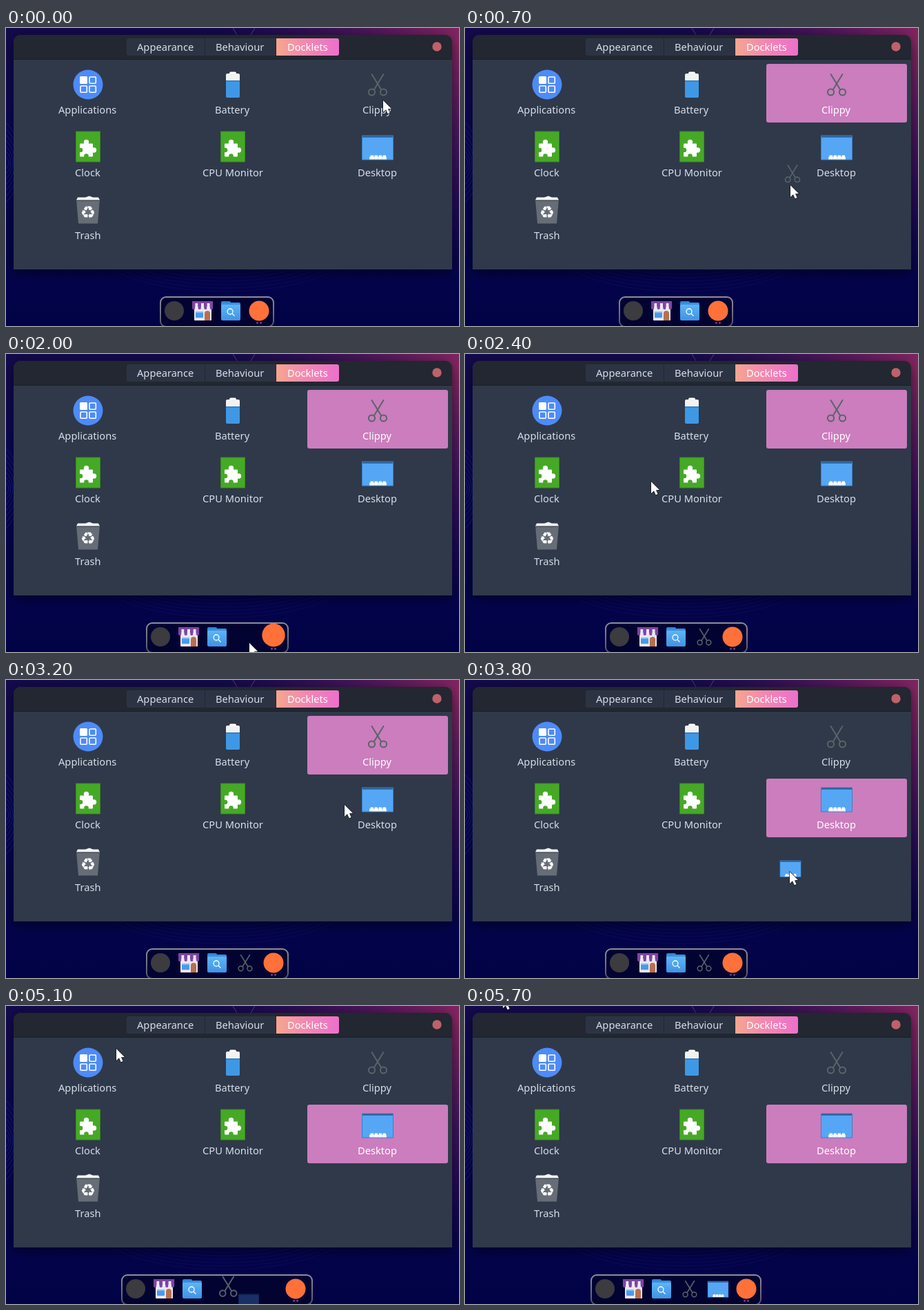
These frames come from a looping animation (657x432 px, 6000 ms). An HTML page with a canvas:

```html
<!DOCTYPE html>
<html lang="en">
<head>
<meta charset="utf-8">
<title>Adding docklets</title>
<style>
html, body { margin: 0; width: 100%; height: 100%; overflow: hidden; background: #05053f; }
canvas { display: block; }
</style>
</head>
<body>
<canvas id="stage" width="657" height="432"></canvas>
<script>
const W = 657, H = 432, LOOP = 6000, STEP = 100;
const SLOT = 41, DOCK_CENTER = 306, DOCK_Y = 410;
const FONT = '14.67px "Noto Sans", sans-serif';
const stage = document.getElementById('stage').getContext('2d');
let c = stage;

// Stops of the pointer: time, x, y
const ROUTE = [
  [200, 547, 105], [1350, 360, 411], [1700, 349, 415], [2000, 353, 419],
  [2600, 241, 103], [3400, 537, 196], [4350, 365, 410], [4800, 362, 411],
  [5100, 160, 62], [5400, 66, -30], [5600, 55, -14]
];

const clamp = v => Math.max(0, Math.min(1, v));
const ramp = (t, from, to) => clamp((t - from) / (to - from));
const smooth = p => p * p * (3 - 2 * p);
const between = (t, from, to) => t >= from && t < to;

function pointerAt(t) {
  let [, x, y] = ROUTE[0];
  for (let i = 1; i < ROUTE.length; i++) {
    const [time, nextX, nextY] = ROUTE[i];
    const p = smooth(ramp(t, ROUTE[i - 1][0], time));
    x += (nextX - x) * p;
    y += (nextY - y) * p;
  }
  return [x, y];
}

function box(x, y, w, h, fill, r = 0) {
  c.fillStyle = fill;
  c.beginPath();
  c.roundRect(x, y, w, h, r);
  c.fill();
}

function disc(x, y, r, fill) {
  c.fillStyle = fill;
  c.beginPath();
  c.arc(x, y, r, 0, Math.PI * 2);
  c.fill();
}

function ring(x, y, rx, ry = rx) {
  c.beginPath();
  c.ellipse(x, y, rx, ry, 0, 0, Math.PI * 2);
  c.stroke();
}

function poly(points, fill) {
  c.fillStyle = fill;
  c.beginPath();
  points.forEach(([x, y]) => c.lineTo(x, y));
  c.closePath();
  c.fill();
}

function line(x1, y1, x2, y2) {
  c.beginPath();
  c.moveTo(x1, y1);
  c.lineTo(x2, y2);
  c.stroke();
}

// Centred text, starting on a whole pixel
function label(text, x, y, fill = '#d8dee9') {
  c.font = FONT;
  c.textAlign = 'left';
  c.fillStyle = fill;
  c.fillText(text, Math.floor(x - c.measureText(text).width / 2), y);
}

function gradient(x1, y1, x2, y2, ...colors) {
  const g = c.createLinearGradient(x1, y1, x2, y2);
  colors.forEach((color, i) => g.addColorStop(i / (colors.length - 1), color));
  return g;
}

// Draws an icon with its centre at x, y
function place(icon, x, y, scale = 1, alpha = 1) {
  c.save();
  c.translate(x, y);
  c.scale(scale, scale);
  c.globalAlpha = alpha;
  icon();
  c.restore();
}

function applications() {
  disc(0, 0, 21.5, '#4d8bf8');
  box(-12, -12, 11, 11, '#fff', 1.5);
  c.strokeStyle = '#fff';
  c.lineWidth = 1.6;
  for (const [x, y] of [[2, -11], [-11, 2], [2, 2]]) {
    c.beginPath();
    c.roundRect(x, y, 9.3, 9.3, 1);
    c.stroke();
  }
}

function battery() {
  box(-5, -18.5, 10, 5, '#fff', 2);
  box(-10, -16, 20, 34, '#f2f2f2', 2);
  box(-10, -6, 20, 25, '#3f98e5', [0, 0, 2, 2]);
  box(-10, -6, 20, 1.5, '#2d78bd');
}

function scissors() {
  c.strokeStyle = '#596468';
  c.lineCap = 'round';
  c.lineWidth = 2;
  for (const side of [-1, 1]) {
    line(side * 8.5, -15, side * -5, 7);
    ring(side * 8.5, 11, 4.6);
  }
}

function puzzle() {
  box(-18, -23, 36, 45, '#3a8a20', 1);
  box(-17, -22, 34, 43, '#46a926');
  box(-12, -5, 19, 19, '#fff', 1);
  disc(-2.5, -7, 3.7, '#fff');
  disc(8.5, 4.5, 3.7, '#fff');
  disc(-11, 4.5, 3.3, '#46a926');
  disc(-2.5, 13, 3.3, '#46a926');
}

function desktop() {
  box(-23, -17, 46, 36, '#3b80c4', 1);
  box(-22, -14, 44, 32, '#55a7f5');
  box(-22, -16, 44, 2, '#2a5f94');
  box(-12, 14, 25, 4, '#d9ebfb', .5);
  for (let i = 0; i < 4; i++) box(-10.5 + i * 6, 12, 4.5, 5, '#fff', .5);
}

function trash() {
  poly([[-17, -15], [17, -15], [14, 20], [-14, 20]], '#666d77');
  poly([[-17, -14], [-15, -18], [-4, -18], [2, -20], [7, -18], [15, -18], [17, -14]], '#f4f4f4');
  box(-17, -14, 34, 1.5, '#4c535d');
  c.font = '25px "DejaVu Sans", sans-serif';
  c.textAlign = 'center';
  c.fillStyle = '#fff';
  c.fillText('\u267B\uFE0E', 0, 12);
}

function shop() {
  box(-12, -6, 25, 20, '#e9e6ef', 1);
  box(-10, 1, 11, 9, '#4a9ae8', 1);
  box(-10, 1, 11, 2, '#83bff5');
  box(3, 0, 8, 14, '#b96f4d', [4, 4, 0, 0]);
  for (let i = 0; i < 7; i++) {
    box(-15 + i * 4.3, -14, 4.3, 12, i % 2 ? '#efe6f6' : '#7d469e', [0, 0, 2, 2]);
  }
  box(-14, -14, 28, 3, '#7d469e', [2, 2, 0, 0]);
}

function folder() {
  box(-14, -14, 14, 8, '#2f80d0', 2);
  box(-14, -12, 28, 12, '#3b8fdd', 2);
  box(-14, -9, 28, 23, gradient(0, -9, 0, 14, '#5cb5f8', '#3f93e4'), 2);
  c.strokeStyle = '#fff';
  c.lineWidth = 1.3;
  ring(-1, 1, 4);
  line(2, 4, 5.5, 7.5);
}

const orb = () => disc(0, 0, 14, '#3b3b40');
const flame = () => disc(0, 0, 14.5, '#ff7139');

const GRID = [
  ['Applications', applications], ['Battery', battery], ['Clippy', scissors],
  ['Clock', puzzle], ['CPU Monitor', puzzle], ['Desktop', desktop], ['Trash', trash]
];

function wallpaper() {
  c.fillStyle = gradient(0, 0, 0, H, '#140a4c', '#0b0756', '#05044f', '#020246');
  c.fillRect(0, 0, W, H);
  const glow = c.createRadialGradient(W, 20, 0, W, 20, 340);
  glow.addColorStop(0, 'rgba(135,38,98,1)');
  glow.addColorStop(1, 'rgba(80,20,98,0)');
  c.fillStyle = glow;
  c.fillRect(0, 0, W, H);
  c.lineWidth = 1;
  for (let i = 0; i < 7; i++) {
    c.strokeStyle = 'rgba(50,70,230,.35)';
    ring(-40, 195, 44 + i * 3, 22 + i * 9);
    c.strokeStyle = 'rgba(70,60,170,.12)';
    ring(DOCK_CENTER + 10, 320, 130 + i * 9, 32 + i * 5);
  }
  c.strokeStyle = 'rgba(225,150,200,.35)';
  line(329, 0, 335, 10);
  line(361, 0, 355, 10);
}

function settingsWindow() {
  c.save();
  c.shadowColor = 'rgba(0,0,0,.55)';
  c.shadowBlur = 18;
  c.shadowOffsetY = 4;
  box(11, 10, 636, 340, '#2f394a', [10, 10, 0, 0]);
  c.restore();
  box(11, 10, 636, 36, '#222731', [10, 10, 0, 0]);
  box(11, 45, 636, 1, '#1c2028');
  box(175, 15, 113, 25, '#2c3444', [3, 0, 0, 3]);
  box(289, 15, 102, 25, '#2c3444');
  box(392, 15, 91, 25, gradient(392, 0, 483, 0, '#f6a68f', '#f386b2', '#ec70ca'), [0, 3, 3, 0]);
  label('Appearance', 231.5, 33);
  label('Behaviour', 340, 33);
  label('Docklets', 437.5, 33, '#fff');
  disc(625, 27, 6.7, '#bf616a');
}

function cells(selected) {
  GRID.forEach(([name, icon], i) => {
    const x = 119 + i % 3 * 210, row = Math.floor(i / 3) * 91;
    if (name === selected) box(x - 102, 52 + row, 204, 85, '#cb7dbe', 3);
    place(icon, x, 82 + row - (row ? .5 : 0));
    label(name, x, 124 + row, name === selected ? '#fff' : undefined);
  });
}

// A slot opens for each dragged icon; hovering widens the dock further
function dock(t, pointerX, pointerY) {
  const slots = 4 + ramp(t, 1200, 1500) + ramp(t, 4100, 4400);
  const hover = ramp(t, 1300, 1500) - ramp(t, 1900, 2000) + ramp(t, 4100, 4400) - ramp(t, 5000, 5400);
  const width = 2 + SLOT * slots + 40 * hover;
  const left = Math.round(DOCK_CENTER - width / 2), right = Math.round(left + width);
  const slotX = i => left + 21 + SLOT * i;

  c.beginPath();
  c.roundRect(left + 1, 390, right - left - 2, 43, 8);
  c.fillStyle = 'rgba(4,4,42,.72)';
  c.fill();
  c.strokeStyle = gradient(0, 390, 0, H, '#8d8d9c', '#55556c');
  c.lineWidth = 2;
  c.stroke();

  [orb, shop, folder].forEach((icon, i) => place(icon, slotX(i), DOCK_Y));
  const clipIn = ramp(t, 2000, 2300);
  place(scissors, slotX(3) + 15 * hover, DOCK_Y - 5 * hover + 30 * (1 - clipIn), .75 + .25 * hover, clipIn);
  const deskIn = ramp(t, 5050, 5350);
  place(desktop, slotX(4), DOCK_Y + 22 * (1 - deskIn), .66, deskIn);

  const x = right - 22 - 4 * hover;
  const near = pointerY > 390 ? clamp(1 - Math.abs(pointerX - x) / 90) : 0;
  place(flame, x, DOCK_Y - 4 * near, 1 + .25 * near);
  for (const side of [-1, 1]) disc(x + side * 2.5, 427.5, 1.4, '#77428c');
}

function tooltip(x) {
  box(x - 83, 311, 166, 49, '#1b2029', 5);
  box(x - 82, 312, 164, 47, '#222832', 4);
  label('Drop to add to dock', x, 341, '#e5e9f0');
}

function pointer(x, y) {
  c.save();
  c.translate(x, y);
  c.beginPath();
  [[0, 0], [0, 17], [4, 13.3], [6.7, 19.3], [9.6, 18], [7, 12.3], [12, 12]].forEach(([px, py]) => c.lineTo(px, py));
  c.closePath();
  c.lineJoin = 'round';
  c.lineWidth = 1.4;
  c.strokeStyle = '#15171c';
  c.stroke();
  c.fillStyle = '#fff';
  c.fill();
  c.restore();
}

const backdrop = document.createElement('canvas');
backdrop.width = W;
backdrop.height = H;

function paintBackdrop() {
  c = backdrop.getContext('2d');
  wallpaper();
  settingsWindow();
  c = stage;
}

function render(t) {
  const [x, y] = pointerAt(t).map(Math.round);
  c.drawImage(backdrop, 0, 0);
  cells(t < 200 ? '' : t < 3500 ? 'Clippy' : 'Desktop');
  dock(t, x, y);
  if (between(t, 1200, 2000)) tooltip(x + 3);
  if (between(t, 4200, 4900)) tooltip(x + 1);
  if (between(t, 400, 2000)) place(scissors, x + 3, y - 17, .8);
  if (between(t, 3700, 4900)) place(desktop, x + 1, y - 5, .67);
  pointer(x, y);
}

paintBackdrop();
const start = performance.now();
function tick() {
  const t = (performance.now() - start) % LOOP;
  render(Math.floor(t / STEP) * STEP);
  requestAnimationFrame(tick);
}
tick();
</script>
</body>
</html>
```
